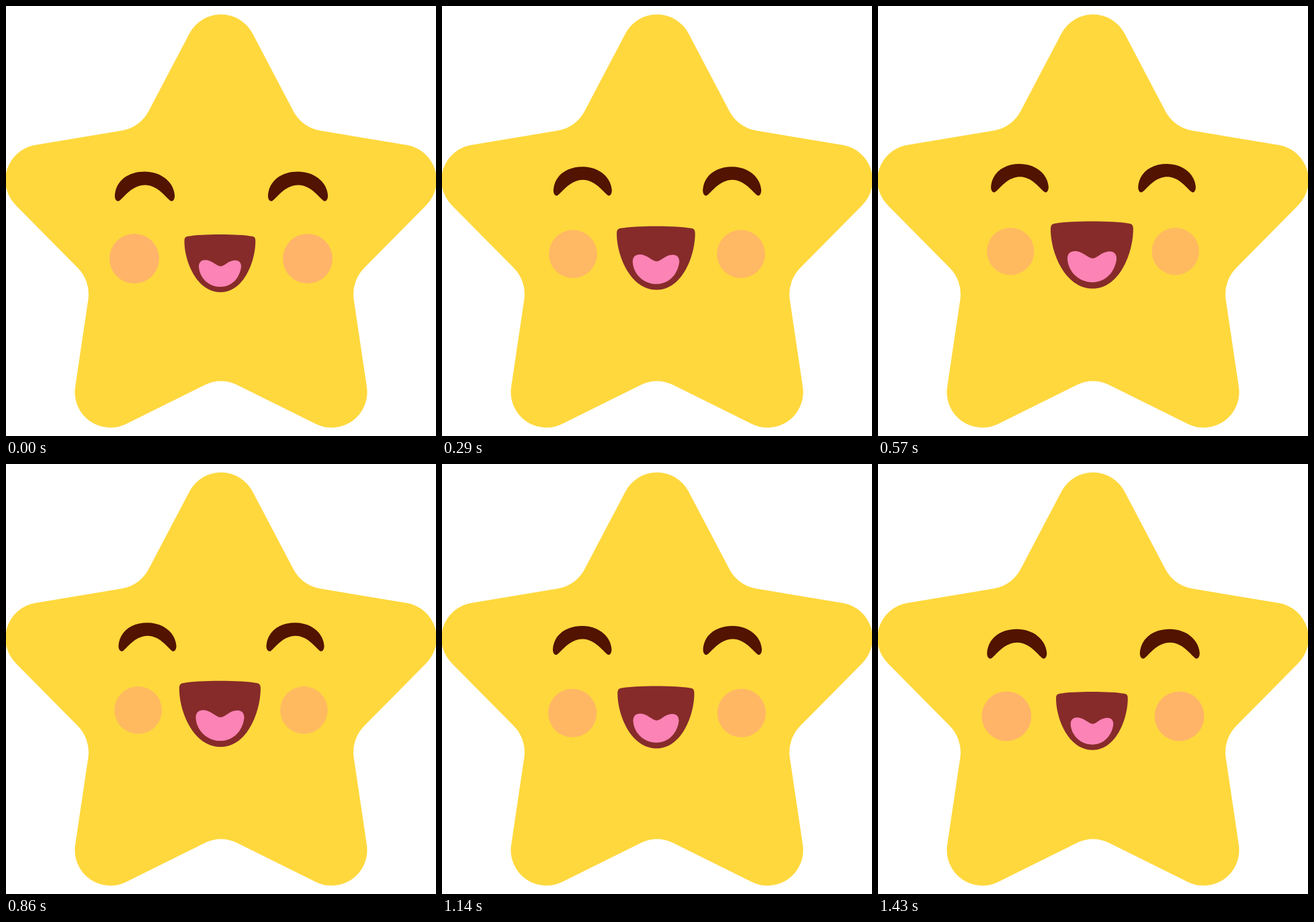
An HTML page for the animation above (1.5 s loop, 640x640 px).

```html
<!DOCTYPE html>
<html lang="en">
<head>
<meta charset="utf-8">
<title>Laughing star</title>
<style>
  @property --lift { syntax: "<number>"; inherits: true; initial-value: 0; }

  html, body { margin: 0; width: 100%; height: 100%; overflow: hidden; background: #fff; }

  svg {
    display: block;
    width: 100%;
    height: 100%;
    animation: laugh 1500ms infinite paused;
    animation-delay: calc(var(--time, 0) * -1ms);
  }

  @keyframes laugh {
    0% { --lift: 0; animation-timing-function: cubic-bezier(.2, .24, .58, 1); }
    43.3% { --lift: 1; animation-timing-function: cubic-bezier(.33, 0, .85, 1); }
    100% { --lift: 0; }
  }

  .part {
    transform: translateY(calc(var(--lift) * var(--rise) * -1px))
               scale(calc(1 + var(--lift) * var(--grow)));
  }
  .eyes { --rise: 12.5; --grow: -.04; transform-origin: 320.5px 268.5px; fill: #521300; }
  .cheeks {
    --rise: 11; --grow: -.05;
    transform-origin: 320px 376px;
    fill: #ffb469;
    opacity: calc(1 - var(--lift) * .2);
  }
  .mouth { --rise: 12.7; --grow: .165; transform-origin: 318.5px 383px; fill: #862b2a; }
</style>
</head>
<body>
<svg viewBox="0 0 640 640">
  <path fill="#ffd83d" d="M273 41A53 53 0 0 1 367 41L428 157A55 55 0 0 0 468 185.5
    L597 207A53 53 0 0 1 625 297L534 389A56 56 0 0 0 517.5 436
    L537 567A53 53 0 0 1 461 622L344 564A54 54 0 0 0 296 564
    L179 622A53 53 0 0 1 103 567L122.5 436A56 56 0 0 0 106 389
    L15 297A53 53 0 0 1 43 207L172 185.5A55 55 0 0 0 212 157Z"/>
  <g class="part cheeks">
    <circle cx="191" cy="376" r="37"/>
    <circle cx="449" cy="376" r="37"/>
  </g>
  <g class="part eyes">
    <path id="eye" d="M162 281C164 259 183 246.5 206.5 246.5C230 246.5 249 261 251 281
      C251.5 287 249 290.5 246.5 290.5C241.5 290.5 228 266.5 207 266.5
      C185 266.5 172 290.5 167 290.5C164 290.5 161.5 287 162 281Z"/>
    <use href="#eye" x="228"/>
  </g>
  <g class="part mouth">
    <path d="M265.5 350C265.5 345 267 343.5 271 342.8C290 339 347 339 366 342.8
      C370 343.5 371.3 345 371.3 350C371.3 380 354 426 319.5 426C284 426 265.5 380 265.5 350Z"/>
    <path fill="#fb83b5" d="M287 388C287 381 291 378 297 378C306 378 314 387.5 319.5 387.5
      C325 387.5 331 378.5 341 378.5C347 378.5 350 382 350 388
      C348 405 336 418 319 418C302 418 288 405 287 388Z"/>
  </g>
</svg>
<script>
  const LOOP = 1500, STEPS = 21, ROUNDING = 5;
  const star = document.querySelector("svg");

  // Hold each pose for one of 21 equal steps, with changes rounded to 10 ms.
  function draw(now) {
    const time = now % LOOP;
    const step = Math.min(STEPS - 1, Math.floor((time + ROUNDING) * STEPS / LOOP));
    star.style.setProperty("--time", step * LOOP / STEPS);
  }

  const start = performance.now();
  function tick() {
    draw(performance.now() - start);
    requestAnimationFrame(tick);
  }
  tick();
</script>
</body>
</html>
```
